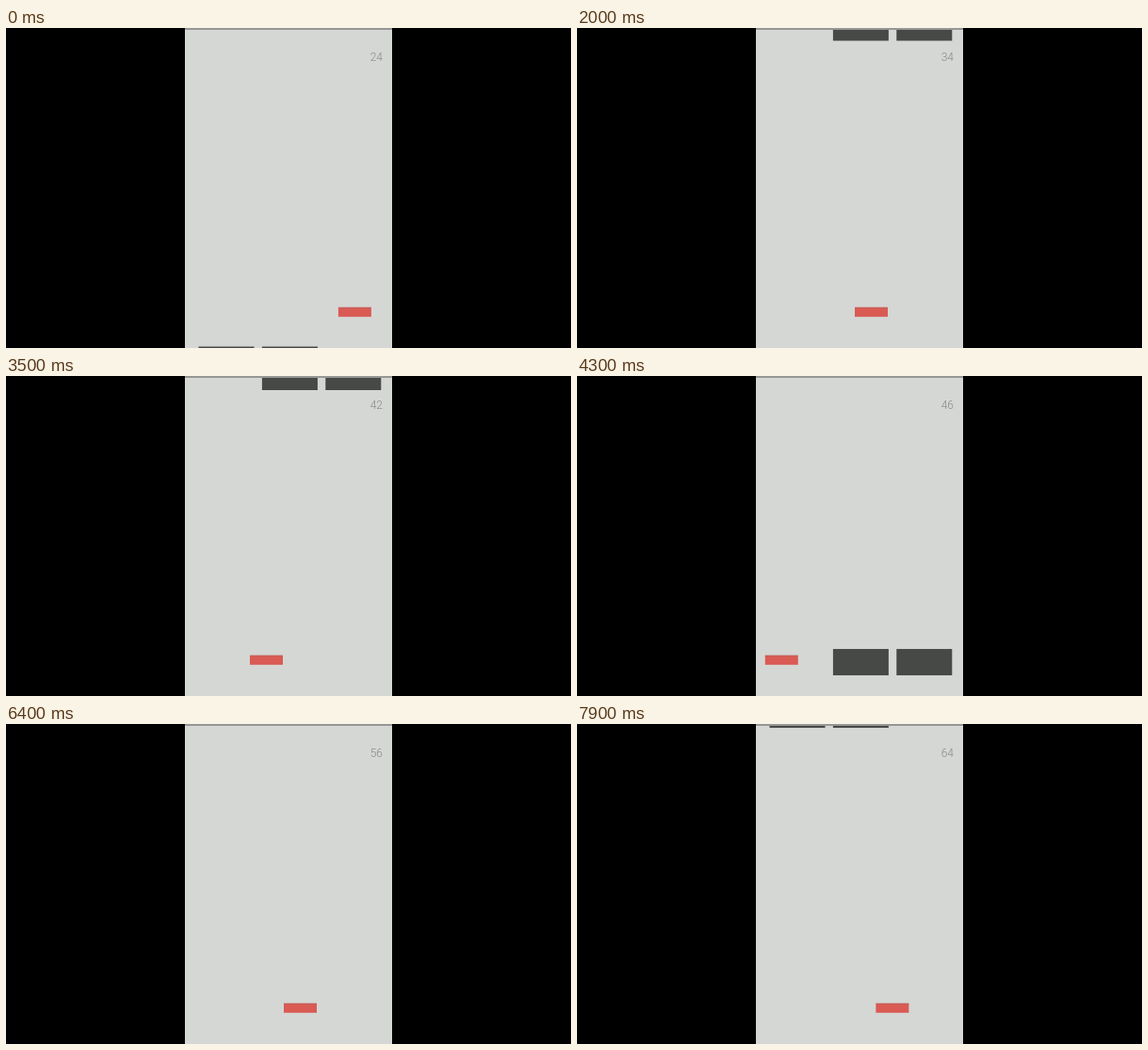
Recreate the animation shown at these times as an HTML page with a canvas. Size 600 by 340 pixels, loop 8 s.

```html
<!DOCTYPE html>
<html>
<head>
<meta charset="utf-8">
<style>
html, body { margin: 0; width: 100%; height: 100%; overflow: hidden; background: #000; }
canvas { display: block; }
</style>
</head>
<body>
<canvas id="stage" width="600" height="340"></canvas>
<script>
const ctx = document.getElementById('stage').getContext('2d');
const LOOP = 8000, STEP = 100;
const FIRST = -3, LAST = 3;
const SAFE_X = [199, 295, 355]; // player's place in each open lane

// Row n: when it enters, which lane it leaves open, how far it has fallen
const startOf = n => 3500 + 1500 * n + 3 * n * n * (1 - n);
const gapOf = n => Math.max(0, Math.abs(n) - 1);
const rowY = s => -13 + 246 * s + 166 * s * s;
const passOf = n => startOf(n) + 830;

const smooth = u => u * u * (3 - 2 * u);

// Between two rows the player drifts to a resting place, then to the next gap
function playerX(t) {
  let n = FIRST;
  while (passOf(n + 1) <= t) n++;
  const u = (t - passOf(n)) / (passOf(n + 1) - passOf(n));
  const from = gapOf(n), to = gapOf(n + 1);
  const rest = 259 + 36 * (from + to) ** 0.44;
  const safe = SAFE_X[u < 0.5 ? from : to];
  const ease = smooth(Math.min(1, 3.3 * Math.min(u, 1 - u)));
  return safe + (rest - safe) * ease;
}

function rect(color, x, y, w, h) {
  ctx.fillStyle = color;
  ctx.fillRect(x, y, w, h);
}

function draw(t) {
  rect('#000', 0, 0, 600, 340);
  rect('#d5d7d4', 190, 0, 220, 340);

  for (let n = FIRST; n <= LAST; n++) {
    const s = (t - startOf(n)) / 1000;
    if (s < -0.1 || s > 1) continue;
    for (let lane = 0; lane < 3; lane++) {
      if (lane !== gapOf(n)) rect('#474946', 204.5 + 67.4 * lane, rowY(s), 59, 28);
    }
  }

  const x = playerX(t);
  rect('#da5a54', x, 296.8, 35, 10);
  rect('#b3605b', x, 296.8, 35, 0.7);

  rect('#969694', 190, 0, 220, 2);

  ctx.fillStyle = '#868885';
  ctx.font = '300 12px Roboto, sans-serif';
  ctx.textAlign = 'right';
  ctx.fillText(Math.floor(24.2 + 5.1 * t / 1000), 400, 34.5);
}

function tick() {
  const t = performance.now() % LOOP;
  draw(Math.floor(t / STEP) * STEP);
  requestAnimationFrame(tick);
}
tick();
</script>
</body>
</html>
```
